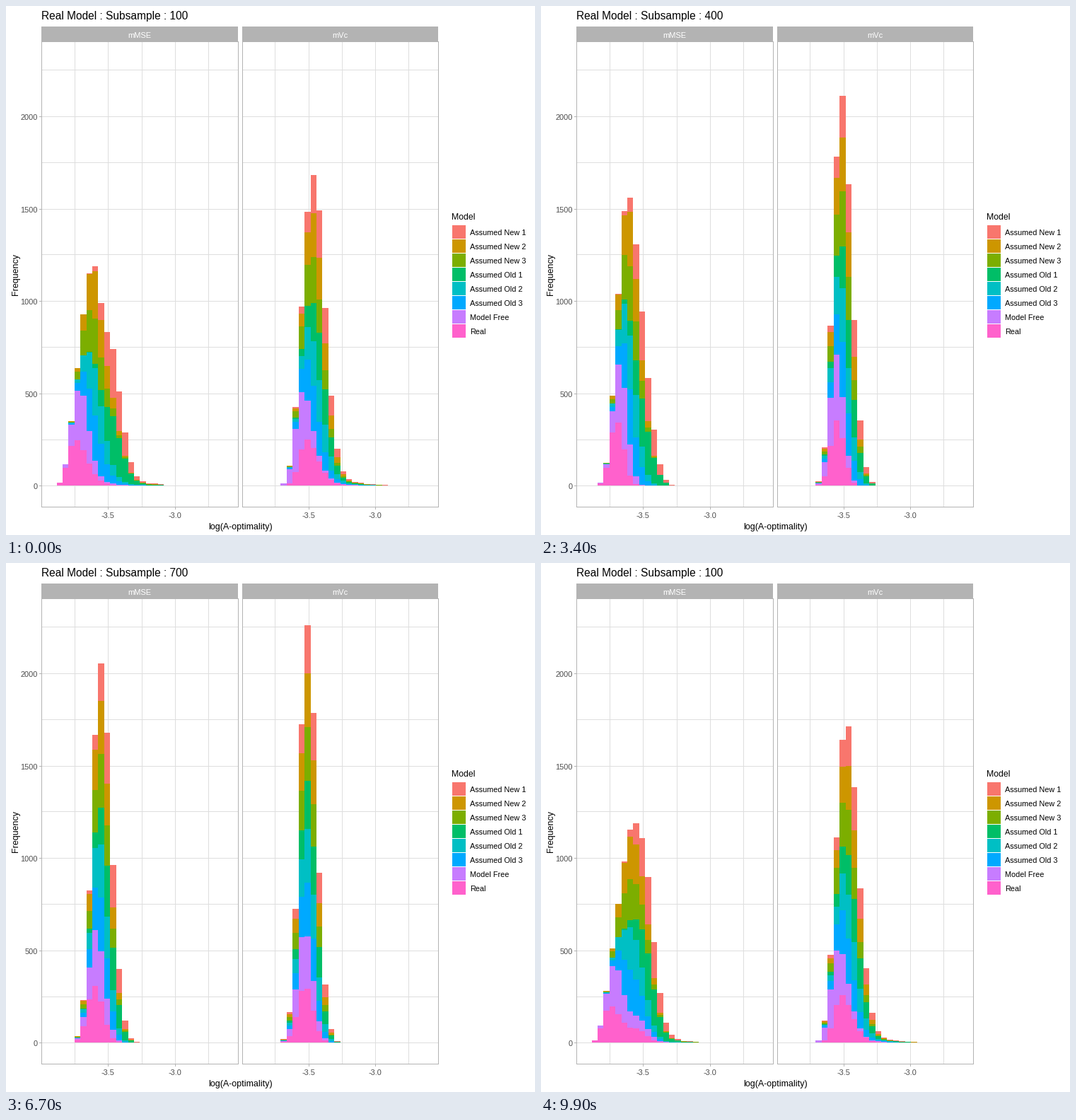
Recreate the animation shown at these times as a matplotlib script. Size 748x748 px, loop 10000 ms.

```python
import numpy as np
import matplotlib.pyplot as plt
from matplotlib.animation import FuncAnimation
from matplotlib.collections import PolyCollection
from matplotlib.patches import Rectangle

SIZE, DPI = 748, 64
PT = 72 / DPI  # points per pixel
FRAMES, INTERVAL = 100, 100
ZERO, SCALE = 678.35, 0.2612  # pixel row of zero, pixels per count
GREY, GRID, TICK = "#B3B3B3", "#DEDEDE", "#4D4D4D"
PANELS = {"mMSE": (50, 328), "mVc": (334, 611)}

BINS = np.arange(1, 25)
BIN_WIDTH = 8.417
FIRST_EDGE = (63.1, 346.4)
RUNS = 1000  # simulations per model

# name, colour, family of curves it follows
MODELS = [
    ("Assumed New 1", "#F8766D", "wide"), ("Assumed New 2", "#CD9600", "mid"),
    ("Assumed New 3", "#7CAE00", "near"), ("Assumed Old 1", "#00BE67", "wide"),
    ("Assumed Old 2", "#00BFC4", "mid"), ("Assumed Old 3", "#00A9FF", "near"),
    ("Model Free", "#C77CFF", "free"), ("Real", "#FF61CC", "real"),
]

# Peak position in bins, at these subsample sizes
KEYS = (100, 200, 400, 900)
PEAKS = {
    "mMSE": {"real": (3.4, 3.43, 4.68, 8.37), "free": (4.4, 4.6, 5.54, 8.45),
             "near": (6.35, 6.32, 6.82, 8.58), "mid": (6.75, 6.6, 6.98, 8.64),
             "wide": (9.95, 9.35, 9.18, 9.01)},
    "mVc": {"real": (8.6, 8.1, 8.05, 8.82), "free": (7.65, 7.57, 7.82, 8.85),
            "near": (9.4, 9.07, 8.97, 9.0), "mid": (10.0, 9.43, 9.1, 9.05),
            "wide": (10.7, 10.18, 9.8, 9.19)},
}
# Left width of the small samples, and their right/left ratio at size 100
SHAPES = {"real": (1.05, 2.0), "free": (1.03, 1.4), "near": (1.24, 1.5),
          "mid": (1.27, 1.45), "wide": (1.4, 1.2)}


def counts(panel, family, size):
    """Histogram of one model: a two-sided bell, long-tailed at size 100."""
    width, skew = SHAPES[family]
    early = max(0, 2 - size / 100)
    d = BINS - np.interp(size, KEYS, PEAKS[panel][family])
    left = np.interp(size, (400, 900), (width, 1.3))
    right = left * (1.15 + early * (skew - 1.15))
    bell = np.exp(-(d / np.where(d < 0, left, right)) ** 2 / 2)
    bell += early * 0.12 * np.exp(-d / 3) * (d > 0)
    return np.round(RUNS * bell / bell.sum())


def state(size):
    """Stack heights by panel, model from the bottom up, and bin."""
    return np.array([np.cumsum([counts(panel, family, size)
                                for *_, family in reversed(MODELS)], axis=0)
                     for panel in PANELS])


STATES = [state(size) for size in range(100, 1000, 100)]

# First frame and step count of each transition
MOVES = [(6, 6), (18, 6)] + [(30 + 11 * i, 5) for i in range(7)]

plt.rcParams["font.family"] = "Liberation Sans"
fig = plt.figure(figsize=(SIZE / DPI, SIZE / DPI), dpi=DPI, facecolor="white")
ax = fig.add_axes([0, 0, 1, 1])
ax.set(xlim=(0, SIZE), ylim=(SIZE, 0))
ax.axis("off")


def text(x, y, s, size, color="black", ha="left", **kw):
    return ax.text(x, y, s, fontsize=size * PT, color=color, ha=ha,
                   va="baseline", **kw)


def box(x0, y0, x1, y1, color, z=1):
    ax.add_patch(Rectangle((x0, y0), x1 - x0, y1 - y0, fc=color, lw=0,
                           antialiased=False, zorder=z))


def hline(y, x0, x1, color, z=1):
    box(x0, y, x1, y + 1, color, z)


def vline(x, y0, y1, color, z=1):
    box(x, y0, x + 1, y1, color, z)


def row(count, snap=round):
    return snap(ZERO - SCALE * count)


for p, (name, (left, right)) in enumerate(PANELS.items()):
    for count in range(0, 2500, 250):
        hline(row(count, int if count % 500 else round), left, right, GRID)
    for k in range(5):
        x = round(97 + 47.25 * k + 283.4 * p)
        vline(x, 50, 708, GRID)
        if k in (1, 3):
            vline(x, 709, 712, GREY)
            text(x, 724, f"{-3.75 + k / 4:.1f}", 11, TICK, "center")
    box(left, 29, right, 50, GREY, 4)
    text((left + right) / 2, 44.5, name, 11, "white", "center", zorder=5)
    for y in (50, 708):
        hline(y, left, right + 1, GREY, 4)
    for x in (left, right):
        vline(x, 50, 709, GREY, 4)

for count in range(0, 2500, 500):
    hline(row(count), 47, 50, GREY)
    text(45, row(count) + 5, str(count), 11, TICK, "right")

text(331, 740, "log(A-optimality)", 12.5, ha="center")
text(17.5, 379.5, "Frequency", 12.5, ha="center", rotation=90,
     rotation_mode="anchor")
text(630, 302, "Model", 12.3)
for k, (name, color, _) in enumerate(MODELS):
    box(631, 310 + 20 * k, 650, 329 + 20 * k, color)
    text(656, 324 + 20 * k, name, 10.9)
title = text(50, 18.5, "", 15.5)

# Each layer reaches from the baseline to its stack height; later ones cover it.
layers = []
for k, (_, color, _) in enumerate(MODELS):
    layer = PolyCollection([], facecolors=color, linewidths=0,
                           antialiaseds=False, zorder=2 + k / 10)
    ax.add_collection(layer, autolim=False)
    layers.append(layer)

x0, x1 = (np.round([e + BIN_WIDTH * (BINS + side) for e in FIRST_EDGE]).ravel()
          for side in (0, 1))
BASE = row(0)


def update(n):
    now, then, t = 0, 0, 1.0
    for i, (start, steps) in enumerate(MOVES):
        if n >= start:
            now, then = i, (i + 1) % len(STATES)
            t = min((n - start + 1) / steps, 1)
    heights = STATES[now] * (1 - t) + STATES[then] * t
    for k, layer in enumerate(layers):
        y = row(heights[:, -1 - k].ravel(), np.round)
        on = y < BASE
        a, b, y = x0[on], x1[on], y[on]
        base = np.full_like(y, BASE)
        layer.set_verts(np.stack([np.column_stack([a, a, b, b]),
                                  np.column_stack([base, y, y, base])], axis=-1))
    closest = then if t >= 0.5 else now
    title.set_text(f"Real Model : Subsample : {100 * (closest + 1)}")
    return [*layers, title]


anim = FuncAnimation(fig, update, frames=FRAMES, interval=INTERVAL,
                     repeat=True, repeat_delay=0, blit=False)
plt.show()
```
